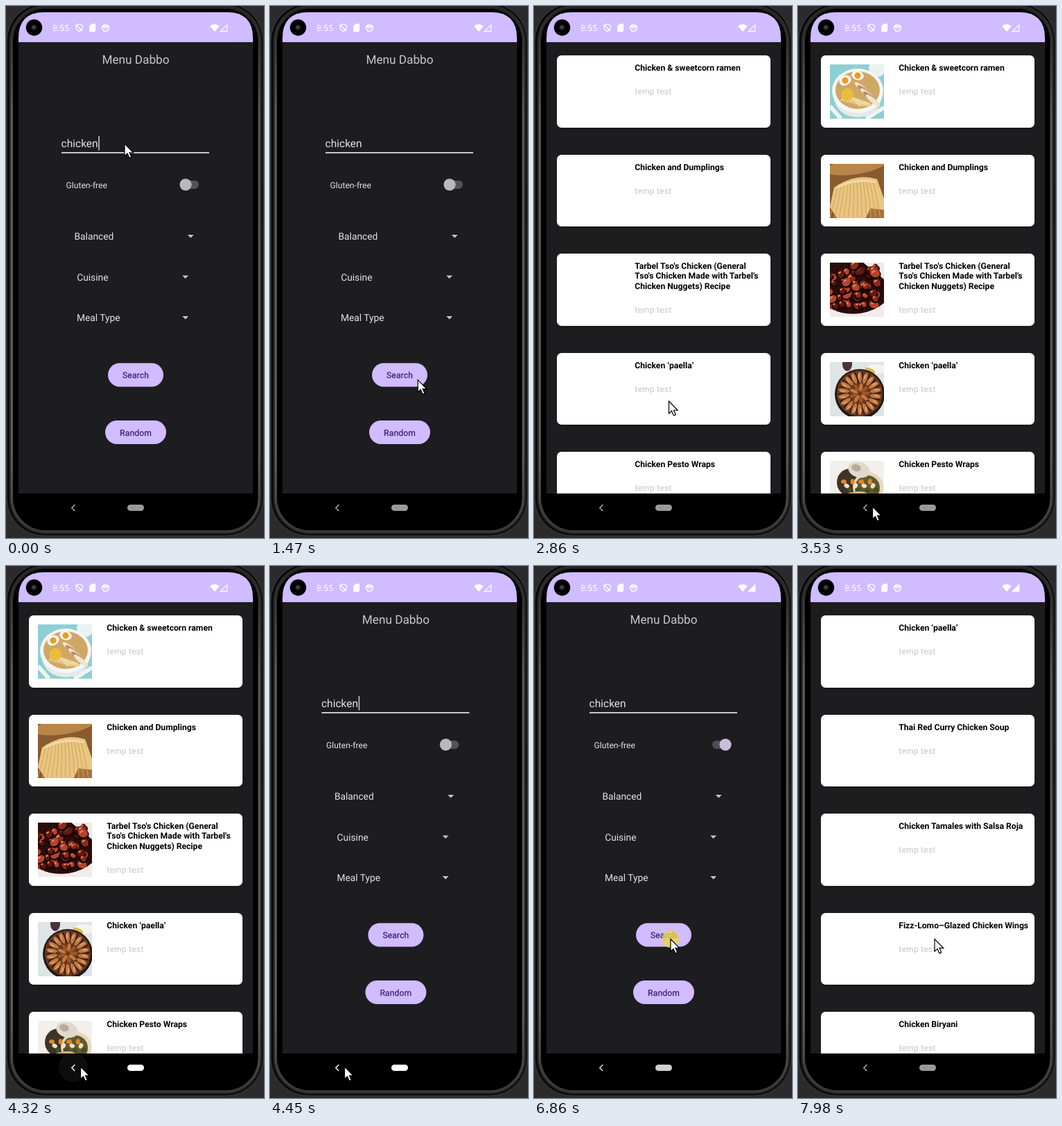
An HTML page that plays this animation: 372 px wide and 765 px high, repeating every 8000 ms.

```html
<!DOCTYPE html>
<html lang="en">
<head>
<meta charset="utf-8">
<title>Recipe app</title>
<style>
html, body { margin: 0; width: 100%; height: 100%; overflow: hidden; background: #2b2b2d; }
svg { display: block; width: 372px; height: 765px; font-family: Roboto, "Open Sans", sans-serif; text-rendering: geometricPrecision; }
.field { font-size: 13.77px; fill: #e6e1e5; }
.button { font-size: 12.05px; letter-spacing: .15px; fill: #381e72; stroke: #381e72; stroke-width: .25; text-anchor: middle; }
.name { font-size: 12.15px; font-weight: 700; fill: #000; }
.note { font-size: 12.05px; letter-spacing: .0179em; fill: #c8c5ca; }
</style>
</head>
<body>
<svg viewBox="0 0 372 765">
  <defs>
    <clipPath id="screen"><path d="M18 701V46Q18 9 55 9H319Q356 9 356 46V701Z"/></clipPath>
    <clipPath id="page"><path d="M18 52H356V701H18Z"/></clipPath>
    <clipPath id="photo"><path d="M0 0H78V78H0Z"/></clipPath>
    <linearGradient id="rim" x2="0" y2="1">
      <stop offset="0" stop-color="#222"/><stop offset=".2" stop-color="#585858"/>
      <stop offset=".85" stop-color="#5c5c5c"/><stop offset="1" stop-color="#3a3a3a"/>
    </linearGradient>
    <radialGradient id="glow">
      <stop offset=".5" stop-color="#fff" stop-opacity=".22"/><stop offset="1" stop-color="#fff" stop-opacity="0"/>
    </radialGradient>
  </defs>

  <rect x="1" y="-4" width="370" height="766" rx="54" fill="#0b0b0b" stroke="#454545"/>
  <g fill="#000">
    <rect x="8" y="2" width="357.5" height="754" rx="49" stroke="#2a2a2a" stroke-width="6"/>
    <rect x="8.5" y="2.5" width="356.5" height="753" rx="48.5" stroke="url(#rim)" stroke-width="3"/>
  </g>

  <g clip-path="url(#screen)">
    <rect x="18" y="9" width="338" height="692" fill="#1d1c1f"/>
    <g clip-path="url(#page)">
      <g id="home"></g>
      <g id="list">
        <rect x="18" y="52" width="338" height="649" fill="#1d1c1f"/>
        <g id="first"></g>
        <g id="second"></g>
      </g>
    </g>
    <rect x="18" y="9" width="338" height="43" fill="#d0bcff"/>
    <circle cx="40.5" cy="31" r="11.7" fill="#000"/>
    <circle cx="40.5" cy="31" r="4.5" fill="#1d1d1f"/>
    <circle cx="40" cy="30.5" r="2" fill="#55565a"/>
    <text x="67" y="35.8" font-size="12.4" fill="#fff">8:55</text>
    <g fill="none" stroke="#fff" stroke-width="1.2">
      <path d="M105.5 26L110 27.7V31Q109.6 34.6 105.5 36.6Q101.4 34.6 101 31V27.7ZM101 26.5L110 36"/>
      <circle cx="143.5" cy="31.5" r="5"/>
    </g>
    <g fill="#fff">
      <path d="M123.5 25.5H128Q129 25.5 129 26.5V36Q129 37 128 37H121Q120 37 120 36V29Z"/>
      <path d="M139 30Q143.5 25 148 30V31H139ZM141 32.5H142.5V34H141ZM144.5 32.5H146V34H144.5Z"/>
      <path d="M294 28.8Q301 23.5 308 28.8L301 37Z"/>
    </g>
    <path id="signal" d="M309.5 36.4H318.8V27Z" stroke="#fff" stroke-width="1.2"/>
  </g>

  <circle id="ripple" cx="97" cy="721" r="21" fill="#fff"/>
  <path id="back" d="M99.3 717L94.8 721.5L99.3 726" fill="none" stroke-width="1.4"/>
  <rect id="pill" x="175" y="717" width="24" height="9" rx="4.5"/>
  <circle id="click" r="12.5" fill="#e8d83c" opacity=".75"/>
  <path id="mouse" d="M0 0V17.6L4 13.9L6.9 20.6L9.8 19.3L7 12.9H12.6Z" fill="#fff" stroke="#000" stroke-width="1.2"/>
</svg>

<script>
const LOOP = 8000;
const $ = id => document.getElementById(id);
const clamp = v => Math.min(1, Math.max(0, v));
const within = (t, a, b) => t >= a && t < b;
const show = (el, on) => el.setAttribute('display', on ? 'inline' : 'none');
const place = (el, x, y) => el.setAttribute('transform', `translate(${x} ${y})`);

// Markup helpers
const text = (x, y, cls, s) => `<text x="${x}" y="${y}" class="${cls}">${s}</text>`;
const disc = (x, y, r, fill) => `<circle cx="${x}" cy="${y}" r="${r}" fill="${fill}"/>`;
const oval = (x, y, rx, ry, fill, turn = 0) =>
  `<ellipse rx="${rx}" ry="${ry}" fill="${fill}" transform="translate(${x} ${y}) rotate(${turn})"/>`;
const box = (x, y, w, h, fill, r = 0) =>
  `<rect x="${x}" y="${y}" width="${w}" height="${h}" rx="${r}" fill="${fill}"/>`;
const shape = (d, fill) => `<path d="${d}" fill="${fill}"/>`;
const line = (d, color, w) => `<path d="${d}" fill="none" stroke="${color}" stroke-width="${w}"/>`;
const repeat = (n, f) => Array.from({ length: n }, (_, i) => f(i)).join('');

let seed = 7;
const rand = () => (seed = seed * 16807 % 2147483647) / 2147483647;

const dropdown = (x, y, arrow, s) => text(x, y + 5, 'field', s) +
  shape(`M${arrow - 4.5} ${y - 2}h9l-4.5 4.5z`, '#cac4d0');
const button = (x, y, w, s) => box(x, y, w, 34, '#d0bcff', 17) + text(x + w / 2, y + 21.5, 'button', s);

$('home').innerHTML =
  '<text x="187" y="83" font-size="17.2" text-anchor="middle" fill="#cac4d0">Menu Dabbo</text>' +
  '<text x="79.6" y="203" font-size="15.5" fill="#e6e1e5">chicken</text>' +
  box(80, 210, 213, 2, '#cac4d8') +
  '<rect id="caret" x="133.2" y="187" width="1.6" height="20.5" fill="#cac4e0"/>' +
  '<text x="86.5" y="261.5" font-size="12.15" fill="#e6e1e5">Gluten-free</text>' +
  '<rect id="track" x="257" y="251" width="21" height="12" rx="6"/>' +
  '<circle id="halo" r="16" fill="url(#glow)"/><circle id="thumb" r="8.6"/>' +
  dropdown(98.5, 331, 266.3, 'Balanced') +
  dropdown(102.2, 389.5, 258.7, 'Cuisine') +
  dropdown(102, 448, 258.7, 'Meal Type') +
  button(147, 513.5, 80, 'Search') + button(143, 596, 88, 'Random');

const photos = [
  // Bowl of noodles with egg halves
  box(0, 0, 78, 78, '#8ecfd3') + disc(68, 6, 12, '#e9f4f2') + line('M0 60L16 78M52 78L78 62', '#eef5f3', 6) +
    shape('M4 38Q6 76 42 76Q74 74 76 38Z', '#e6e8e8') + oval(40, 38, 37, 32, '#f6f6f3') +
    oval(40, 37, 32, 27, '#cfa766') +
    repeat(7, i => line(`M${16 + i * 4} ${52 + i}Q${30 + i * 4} ${38 + i * 2} ${42 + i * 3} 60`, '#f0d9a0', 2)) +
    disc(25, 43, 9, '#e9bd3c') +
    repeat(5, i => oval(46 + i * 4, 34 + i * 4.5, 13, 3.5, i % 2 ? '#b98d62' : '#f3e3cc', 40)) +
    oval(22, 23, 9, 7, '#fbf8f0', -25) + disc(22, 23, 4.5, '#ef9a1e') +
    oval(40, 16, 9, 6.5, '#fbf8f0', 15) + disc(40, 16, 4.5, '#ef9a1e'),
  // Sliced dough on a board
  box(0, 0, 78, 78, '#8a5a30') + oval(36, 4, 44, 11, '#b98549', -8) + oval(70, 70, 16, 12, '#a8713c', -30) +
    shape('M6 34Q38 12 68 22L78 50V66L58 64L52 78H10L0 62Z', '#e9c681') +
    repeat(12, i => line(`M${12 + i * 4.5} ${29 - i * .6}Q${8 + i * 5.5} 50 ${i * 6.6} 77`, '#cfa25a', 1)) +
    line('M10 34Q38 20 66 26', '#f2dba4', 3),
  // Glazed nuggets
  box(0, 0, 78, 78, '#2a0d0a') + shape('M48 0H78V24Z', '#efe9e6') +
    repeat(48, i => {
      const x = rand() * 72, y = 3 + rand() * 64, r = 3.5 + rand() * 4;
      return oval(x, y + 2, r + 1.5, r, '#1c0706') + oval(x, y, r, r * .8, ['#8d2b1a', '#64180f', '#b5442a'][i % 3], i * 40) +
        oval(x - 2, y - 2, r * .4, 1.2, '#e28a66', -30);
    }) + shape('M0 66Q20 76 44 73Q66 69 78 58V78H0Z', '#f1ecea'),
  // Pan with a ring of chicken pieces
  box(0, 0, 78, 78, '#dfe5e7') + oval(25, 3, 7, 10, '#4c3138') + oval(66, 10, 14, 7, '#f6f4ea') +
    oval(58, 12, 8, 3, '#d8bd55', 25) + disc(43, 46, 36, '#241916') + disc(43, 45, 33, '#6b3a1f') +
    repeat(18, i => `<g transform="translate(43 45) rotate(${i * 20})">` +
      oval(0, -23, 3.2, 8, '#bd7640') + oval(-1, -25, 1.2, 4, '#dda066') + line('M4 -14V-31', '#341a11', 1.8) + '</g>') +
    repeat(9, i => oval(43 + 9 * Math.cos(i * .7), 45 + 9 * Math.sin(i * .7), 2.5, 6, i % 2 ? '#c4783d' : '#9a5527', i * 40 + 90)),
  // Bowls of wraps
  box(0, 0, 78, 78, '#f3f0ec') + disc(30, 31, 20, '#3d3427') + disc(55, 38, 22, '#e6d7bd') +
    disc(54, 39, 18, '#5f5a30') + oval(42, 13, 16, 11, '#e0d8cd', 15) + oval(38, 10, 7, 5, '#b9aa98', 20) +
    repeat(12, i => oval(20 + i * 4.2, 30 + i % 3 * 6, 4, 3, ['#e0862a', '#efe0c2', '#465022'][i % 3], i * 30)) +
    oval(30, 57, 26, 11, '#d9b27c', -18)
];

const cards = (titles, pictures) => titles.map((title, i) => {
  const y = 71 + i * 142.6, top = Math.round(y), height = Math.round(y + 103.6) - top;
  const lines = title.split('|');
  return `<g transform="translate(0 ${top})">` + box(32, 1, 310, height + 2, 'rgba(0,0,0,.15)', 8) +
    box(33, 0, 308, height, '#fff', 6.5) +
    lines.map((s, k) => text(145.2, 22 + k * 14.4, 'name', s)).join('') +
    text(145.3, 56 + (lines.length - 1) * 14.4, 'note', 'temp test') +
    (pictures ? `<g class="picture" transform="translate(46 13)" clip-path="url(#photo)">${photos[i]}</g>` : '') +
    '</g>';
}).join('');

$('first').innerHTML = cards(['Chicken &amp; sweetcorn ramen', 'Chicken and Dumplings',
  'Tarbel Tso\'s Chicken (General|Tso\'s Chicken Made with Tarbel\'s|Chicken Nuggets) Recipe',
  'Chicken ‘paella’', 'Chicken Pesto Wraps'], true);
$('second').innerHTML = cards(['Chicken ‘paella’', 'Thai Red Curry Chicken Soup',
  'Chicken Tamales with Salsa Roja', 'Fizz-Lomo–Glazed Chicken Wings', 'Chicken Biryani'], false);
const pictures = document.querySelectorAll('.picture');

// Fast start, very slow end: two joined Bézier curves
const cubic = (a, b, c, d, u) => {
  const v = 1 - u;
  return a * v * v * v + 3 * b * u * v * v + 3 * c * u * u * v + d * u * u * u;
};
function glide(p) {
  p = clamp(p);
  const [xs, ys] = p < 1 / 6
    ? [[0, .05, .1333, 1 / 6], [0, 0, .06, .4]]
    : [[1 / 6, .2083, .25, 1], [.4, .82, 1, 1]];
  let lo = 0, hi = 1;
  for (let i = 0; i < 24; i++) {
    const mid = (lo + hi) / 2;
    if (cubic(...xs, mid) < p) lo = mid; else hi = mid;
  }
  return cubic(...ys, lo);
}

// Keys are [time, ...values]
function track(keys, t, smooth) {
  const next = keys.findIndex(k => k[0] > t);
  if (next < 0) return keys[keys.length - 1].slice(1);
  if (!next) return keys[0].slice(1);
  const a = keys[next - 1], b = keys[next];
  let p = (t - a[0]) / (b[0] - a[0]);
  if (smooth) p = p * p * (3 - 2 * p);
  return a.slice(1).map((v, i) => v + (b[i + 1] - v) * p);
}

const mousePath = [[340, 171, 198], [540, 172, 205], [740, 172, 205], [1150, 247, 460], [1350, 230, 551],
  [1540, 206, 532], [2730, 206, 532], [2880, 194, 570], [3130, 107, 717], [3480, 107, 717], [3530, 107.5, 720],
  [4480, 107.5, 720], [4680, 130, 640], [5310, 261, 256], [5900, 261, 256], [6520, 197, 536.5]];
const navShade = [[3860, 153], [4250, 255], [5850, 255], [6860, 208], [7700, 153]];
const clicks = [[1670, 1870], [3860, 4060], [5570, 5780], [6790, 6990]];
const OPEN_1 = 2320, CLOSE = 4318, OPEN_2 = 7575, SLIDE = 450, SHIFT = 34;

function pages(t) {
  const closing = within(t, CLOSE, OPEN_2);
  const start = closing ? CLOSE : t < CLOSE ? OPEN_1 : OPEN_2;
  const moved = SHIFT * glide((t - start) / SLIDE);
  const fade = clamp((t - start - (closing ? 35 : 50)) / 83);
  place($('home'), closing ? moved - SHIFT : -moved, 0);
  place($('list'), closing ? moved : SHIFT - moved, 0);
  $('list').setAttribute('opacity', closing ? 1 - fade : fade);
  show($('first'), within(t, 2730, 5000));
  show($('second'), t >= 7910);
  pictures.forEach((p, i) => show(p, t >= 2930 + i * 45));
}

function toggle(t) {
  const p = clamp((t - 5800) / 250), on = p * p * (3 - 2 * p);
  const mix = (a, b) => `rgb(${a.map((v, i) => Math.round(v + (b[i] - v) * on))})`;
  const x = 259 + 17 * on;
  place($('thumb'), x, 256.8);
  place($('halo'), x, 256.8);
  $('thumb').setAttribute('fill', mix([185, 185, 185], [202, 190, 220]));
  $('track').setAttribute('fill', mix([84, 83, 86], [80, 75, 88]));
  $('halo').setAttribute('opacity', track([[5640, 0], [5780, 1], [5950, 1], [6250, 0]], t)[0]);
}

function draw(t) {
  pages(t);
  toggle(t);
  const phase = t < 2600 ? 900 : 280;
  show($('caret'), (t - phase + 1000) % 1000 < 500);
  const [x, y] = track(mousePath, t, true);
  place($('mouse'), x, y);
  place($('click'), x, y);
  show($('click'), clicks.some(c => within(t, ...c)));
  const shade = track(navShade, t)[0];
  $('pill').setAttribute('fill', `rgb(${shade},${shade},${shade})`);
  const bright = Math.min(255, shade + 20);
  $('back').setAttribute('stroke', `rgb(${bright},${bright},${bright})`);
  $('ripple').setAttribute('opacity', track([[3900, 0], [4000, .16], [4150, .16], [4400, 0]], t)[0]);
  $('signal').setAttribute('fill', t < 6700 ? 'none' : '#fff');
}

const begin = performance.now();
function frame() {
  draw((performance.now() - begin) % LOOP);
  requestAnimationFrame(frame);
}
frame();
</script>
</body>
</html>
```
